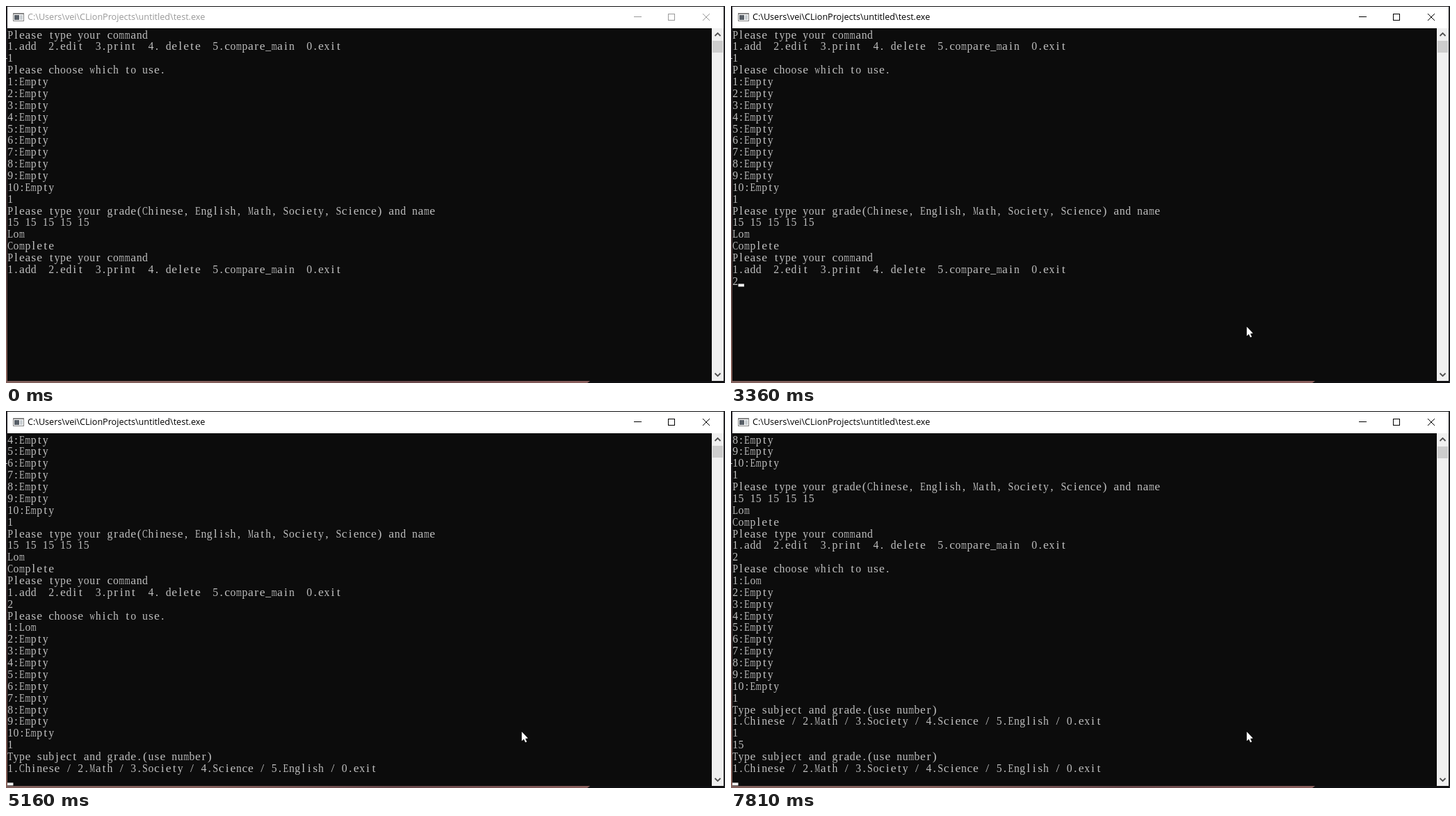
An HTML page with a canvas for the animation above (8000 ms loop, 1034 by 542 pixels).

```html
<!DOCTYPE html>
<html lang="en">
<head>
<meta charset="utf-8">
<title>Console</title>
<style>
  html, body { margin: 0; width: 100%; height: 100%; overflow: hidden; background: #000; }
  canvas { display: block; width: 1034px; height: 542px; }
</style>
</head>
<body>
<canvas id="stage" width="1034" height="542"></canvas>
<script>
const LOOP = 8000;
const ROWS = 30;
const LINE = 506 / ROWS;
const CELL = LINE / 2;
const LEFT = 2;
const TOP = 32.6;
const ctx = document.getElementById('stage').getContext('2d');

const slots = first => Array.from({ length: 10 }, (_, i) => `${i + 1}:${i ? 'Empty' : first}`);
const menu = ['Please type your command',
  '1.add  2.edit  3.print  4. delete  5.compare_main  0.exit'];
const choose = 'Please choose which to use.';
const subjects = ['Type subject and grade.(use number)',
  '1.Chinese / 2.Math / 3.Society / 4.Science / 5.English / 0.exit'];

const log = [
  ...menu, '1', choose, ...slots('Empty'), '1',
  'Please type your grade(Chinese, English, Math, Society, Science) and name',
  '15 15 15 15 15', 'Lom', 'Complete',
  ...menu, '2', choose, ...slots('Lom'), '1',
  ...subjects, '1', '15', ...subjects
];

// Each step changes only the listed parts: printed lines, typed input, caret, pointer.
const steps = [
  { at: 0, lines: 21, input: '', caret: false, active: false, pointer: null, click: false, thumb: 50 },
  { at: 120, pointer: [826, 491] },
  { at: 165, pointer: [765, 470] },
  { at: 210, pointer: [741.7, 461] },
  { at: 1820, active: true, click: true },
  { at: 1920, click: false },
  { at: 2330, caret: true },
  { at: 2660, input: '2' },
  { at: 2850, caret: false },
  { at: 3360, caret: true },
  { at: 3680, lines: 33, input: '' },
  { at: 4420, caret: false },
  { at: 4650, input: '1', caret: true },
  { at: 4920, caret: false },
  { at: 5110, lines: 34, input: '', caret: true },
  { at: 5160, lines: 36 },
  { at: 5990, caret: false },
  { at: 6270, input: '1', caret: true },
  { at: 6500, caret: false },
  { at: 6600, lines: 37, input: '', caret: true },
  { at: 7060, caret: false },
  { at: 7110, input: '1', caret: true },
  { at: 7380, input: '15' },
  { at: 7570, caret: false },
  { at: 7760, lines: 38, input: '', caret: true },
  { at: 7810, lines: 40, thumb: 51 }
];
for (let i = 1; i < steps.length; i++) steps[i] = { ...steps[i - 1], ...steps[i] };

function box(color, x, y, w, h) {
  ctx.fillStyle = color;
  ctx.fillRect(x, y, w, h);
}

function path(points, close) {
  ctx.beginPath();
  points.forEach(([x, y]) => ctx.lineTo(x, y));
  if (close) ctx.closePath();
}

function stroke(color, width, ...points) {
  ctx.strokeStyle = color;
  ctx.lineWidth = width;
  path(points);
  ctx.stroke();
}

function fade(x1, y1, ...colors) {
  const g = ctx.createLinearGradient(0, 0, x1, y1);
  colors.forEach((c, i) => g.addColorStop(i / (colors.length - 1), c));
  return g;
}

function drawDesktop() {
  box('#101012', 0, 0, 1034, 542);
  box('#303034', 1033, 0, 1, 542);
  box(fade(0, 542, '#1d1b20', '#2a2427', '#4b3737', '#8a625a'), 0, 0, 2, 542);
  box('#c8c8c8', 0, 75, 3, 1);
  ctx.fillStyle = fade(838, 0, '#80605c', '#85605c', '#67474a', '#8a5f5d');
  path([[0, 539], [840, 539], [836, 542], [0, 542]], true);
  ctx.fill();
}

function drawTitleBar(active) {
  const ink = active ? '#000' : '#999';
  box('#fff', 2, 1, 1030, 31);

  box('#858585', 10, 10, 16, 12);
  box('#fff', 11, 12, 14, 9);
  box('#596068', 12, 13, 7, 7);
  box('#c9ced2', 20, 13, 4, 7);

  ctx.fillStyle = ink;
  ctx.font = '12.6px "Open Sans", sans-serif';
  ctx.textAlign = 'left';
  ctx.fillText('C:\\Users\\vei\\CLionProjects\\untitled\\test.exe', 31, 20);

  stroke(ink, 1, [903, 15.5], [914, 15.5]);
  ctx.strokeRect(952.5, 11.5, 9, 9);
  stroke(ink, 1, [1002, 11], [1012, 21]);
  stroke(ink, 1, [1012, 11], [1002, 21]);
}

function drawScrollBar(thumb) {
  box('#f0f0f0', 1015, 32, 17, 507);
  box('#cdcdcd', 1016, thumb, 15, 17);
  stroke('#505050', 1.8, [1019.5, 43], [1023.5, 39], [1027.5, 43]);
  stroke('#505050', 1.8, [1019.5, 528], [1023.5, 532], [1027.5, 528]);
}

function drawConsole({ lines, input, caret }) {
  box('#0c0c0c', 2, 32, 1013, 507);
  const first = Math.max(0, lines + 1 - ROWS);
  const shown = [...log.slice(first, lines), input];
  ctx.fillStyle = '#bebebe';
  ctx.font = '17.6px "Liberation Serif", serif';
  ctx.textAlign = 'center';
  shown.forEach((text, row) => {
    [...text].forEach((char, col) => {
      ctx.fillText(char, LEFT + (col + 0.48) * CELL, TOP + row * LINE + 14, CELL * 0.93);
    });
  });
  if (caret) {
    const bottom = TOP + shown.length * LINE;
    box('#f2f2f2', LEFT + input.length * CELL, bottom - 4.2, CELL, 4);
  }
}

function drawPointer([x, y], click) {
  if (click) {
    ctx.fillStyle = '#808006';
    ctx.beginPath();
    ctx.arc(741.3, 460.3, 12.8, 0, Math.PI * 2);
    ctx.fill();
  }
  ctx.save();
  ctx.translate(x, y);
  path([[0, 0], [0, 13.6], [3, 10.8], [5.2, 15.6], [7.3, 14.6], [5.2, 10], [9, 9.6]], true);
  ctx.strokeStyle = '#000';
  ctx.lineWidth = 1.2;
  ctx.stroke();
  ctx.fillStyle = '#fff';
  ctx.fill();
  ctx.restore();
}

function draw(state) {
  drawDesktop();
  drawTitleBar(state.active);
  drawConsole(state);
  drawScrollBar(state.thumb);
  if (state.pointer) drawPointer(state.pointer, state.click);
}

const start = performance.now();
let current = null;
function tick() {
  const time = (performance.now() - start) % LOOP;
  const state = steps.findLast(step => step.at <= time);
  if (state !== current) draw(current = state);
  requestAnimationFrame(tick);
}
tick();
</script>
</body>
</html>
```
